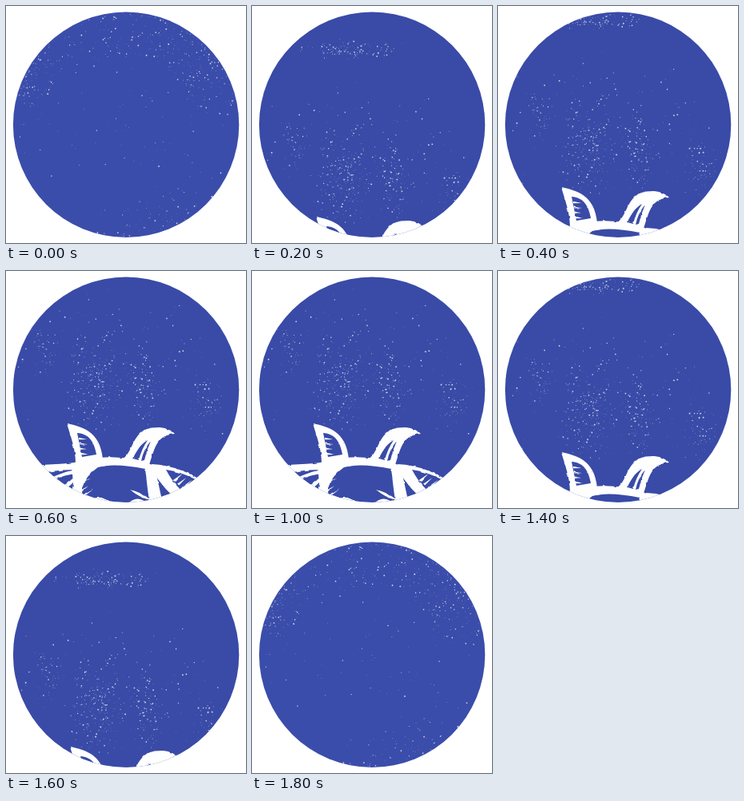
These frames come from a looping animation (300x297 px, 2 s). An HTML page:

```html
<!DOCTYPE html>
<html lang="en">
<head>
<meta charset="utf-8">
<title>Goat print</title>
<style>
  html, body { margin: 0; width: 100%; height: 100%; overflow: hidden; background: #fff; }
  svg { display: block; width: 100%; height: 100%; }
  .w { fill: #fefefe; }
  .b { fill: #394ba7; }
</style>
</head>
<body>
<svg viewBox="0 0 300 297" xmlns="http://www.w3.org/2000/svg">
  <defs>
    <clipPath id="disc"><circle cx="150.1" cy="148.8" r="141.2"/></clipPath>
    <filter id="rough" x="0" y="100" width="300" height="200" filterUnits="userSpaceOnUse" color-interpolation-filters="sRGB">
      <feTurbulence type="fractalNoise" baseFrequency=".13" numOctaves="2" seed="4"/>
      <feDisplacementMap in="SourceGraphic" scale="2.5" xChannelSelector="R" yChannelSelector="G"/>
    </filter>
  </defs>
  <g clip-path="url(#disc)">
    <rect id="ink" width="300" height="297"/>
    <g id="bare"></g>
    <g id="print">
      <g id="grain"></g>
      <g filter="url(#rough)">
        <!-- left horn -->
        <path class="w" d="M80 151C98 155 122 160 125 196L91 201C91 183 85 168 80 151Z"/>
        <path class="b" d="M93 163C108 164 114 174 117 190L99 193Z"/>
        <g id="horn" class="w"></g>
        <!-- right horn -->
        <path class="w" d="M148 197C163 187 160 170 177 159C191 154 206 155 215 164C193 166 191 178 183 203Z"/>
        <path class="b" d="M162 195C167 188 170 178 181 172Q173 184 170 197ZM173 198Q176 183 185 173Q180 184 177 197Z"/>
        <!-- left ear -->
        <path class="w" d="M16 207C40 202 65 203 91 200L108 207L90 223Q72 242 50 245L36 234Z"/>
        <path class="b" d="M31 217Q62 209 89 209Q68 214 42 228ZM43 237Q62 217 92 214Q80 232 53 236Z"/>
        <!-- right ear -->
        <path class="w" d="M186 202Q224 203 266 234Q258 254 240 262Q207 244 187 210Z"/>
        <path class="b" d="M204 209Q232 213 258 232L246 248Q220 240 204 209Z"/>
        <g id="ear" class="w"></g>
        <!-- brow and cheeks -->
        <path class="w" d="M86 201Q140 184 190 204L194 224L206 280L190 288L183 250L178 208Q140 200 119 206Q104 216 99 232L101 290H86Q80 255 88 227Z"/>
        <g id="cheek" class="w"></g>
        <!-- eyes -->
        <path class="w" d="M103 253Q118 237 133 249Q128 264 109 259ZM156 252Q168 239 182 252Q178 265 161 260ZM159 234Q176 238 184 247Q171 244 159 234Z"/>
      </g>
    </g>
  </g>
</svg>
<script>
const STEP = 200, STEPS = 10;
const $ = id => document.getElementById(id);

let seed = 17;
function rnd() {
  seed = (seed * 1664525 + 1013904223) >>> 0;
  return seed / 4294967296;
}
const bell = () => (rnd() + rnd() + rnd() - 1.5) / 0.75;

// Wedges set along a line, each pointing by (dx, dy)
function teeth(id, x0, y0, x1, y1, n, dx, dy) {
  let d = "";
  for (let i = 0; i < n; i++) {
    const t = i / (n - 1), k = 0.6 + 0.5 * rnd();
    const x = x0 + (x1 - x0) * t, y = y0 + (y1 - y0) * t;
    const hx = (x1 - x0) / n / 4, hy = (y1 - y0) / n / 4;
    d += `M${x - hx} ${y - hy}L${x + dx * k} ${y + dy * k}L${x + hx} ${y + hy}Z`;
  }
  $(id).innerHTML += `<path d="${d}"/>`;
}

function fleck(x, y) {
  const s = 0.4 + 1.2 * rnd() ** 3, k = rnd() - 0.5;
  return `M${x} ${y}l${s} ${s * k}l${-s * k} ${s}l${-s} ${-s * k}Z`;
}

function flecks(id, n, place) {
  let d = "";
  for (let i = 0; i < n; i++) d += fleck(...place());
  $(id).innerHTML += `<path d="${d}" fill="#fff" fill-opacity=".75"/>`;
}

const cloud = (id, n, x, y, sx, sy) =>
  flecks(id, n, () => [x + bell() * sx, y + bell() * sy]);

// Flecks that thin out from the rim inwards
const rim = (id, n, angle, spread, depth) =>
  flecks(id, n, () => {
    const a = angle + bell() * spread, r = 140 * (1 - depth * rnd() ** 1.5);
    return [150 + r * Math.cos(a), 149 + r * Math.sin(a)];
  });

rim("bare", 190, -0.75, 0.45, 0.4);
rim("bare", 110, -2.65, 0.3, 0.25);
rim("bare", 90, -1.7, 0.4, 0.4);
rim("bare", 70, 1.3, 0.5, 0.3);
rim("bare", 80, 0, 3, 1);

cloud("grain", 150, 125, -58, 40, 8);
cloud("grain", 230, 112, 108, 22, 38);
cloud("grain", 110, 177, 110, 13, 32);
cloud("grain", 80, 255, 128, 16, 26);
cloud("grain", 60, 52, 55, 12, 28);
cloud("grain", 160, 145, 75, 90, 60);

teeth("horn", 95, 170, 98, 189, 4, 10, 1);
teeth("ear", 214, 223, 240, 246, 6, 13, -11);
teeth("cheek", 97, 228, 98, 244, 3, 16, -11);
teeth("cheek", 98, 260, 99, 284, 5, 26, 3);

// Offsets of the print as it rises out of the lower rim
const rise = [[0, 113], [-1, 76], [-4, 40], [0, 0]];

function draw(ms) {
  const k = Math.floor(ms / STEP) % STEPS;
  const level = k < 5 ? k : Math.min(3, STEPS - 1 - k);
  $("bare").style.display = level ? "none" : "";
  $("print").style.display = level ? "" : "none";
  $("ink").setAttribute("fill", level ? "#394ba7" : "#3b4daa");
  if (level) $("print").setAttribute("transform", `translate(${rise[level - 1]})`);
}

const start = performance.now();
function tick() {
  draw(performance.now() - start);
  requestAnimationFrame(tick);
}
tick();
</script>
</body>
</html>
```
